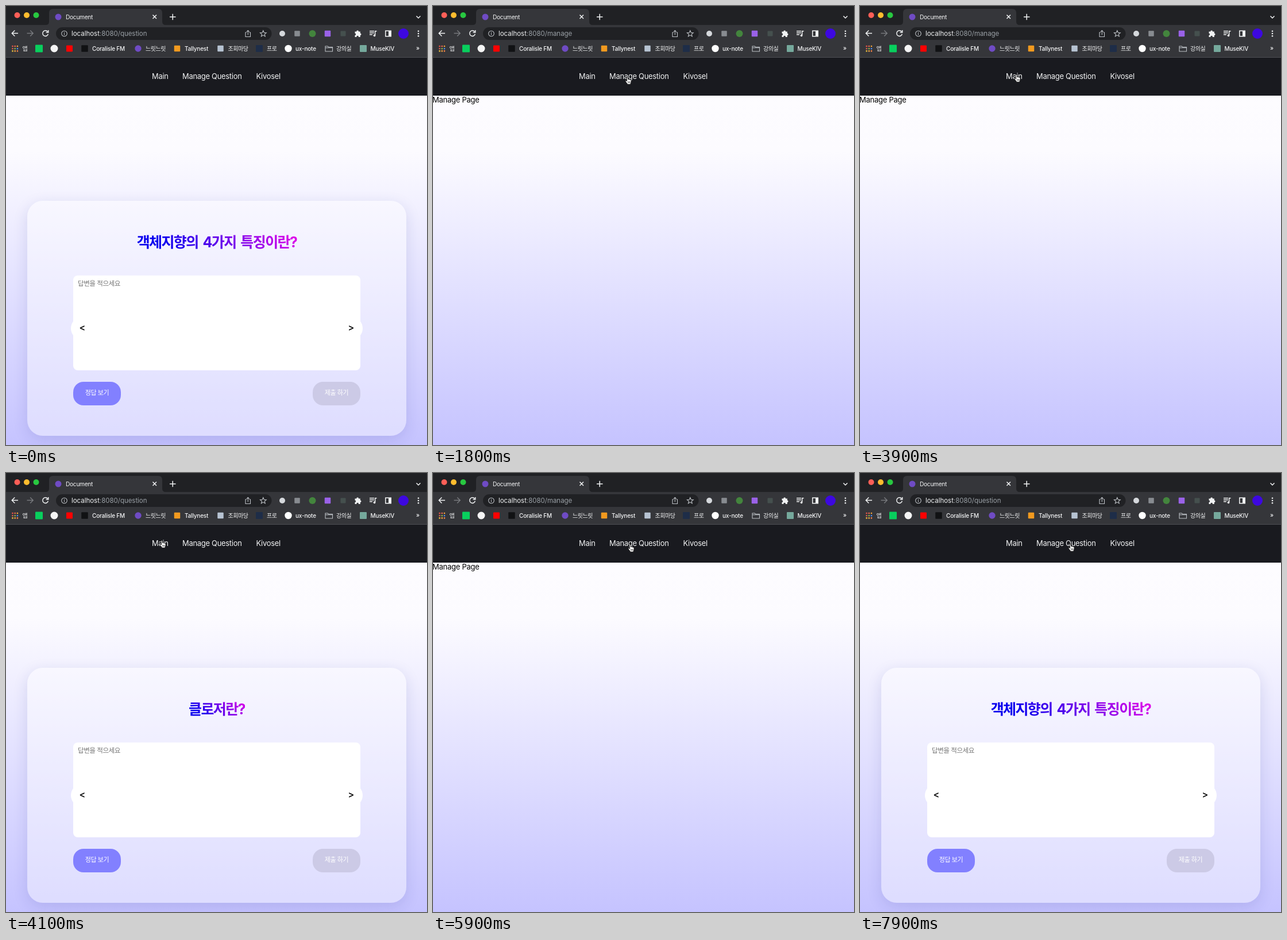
Recreate the animation shown at these times as an HTML page. Size 733 by 764 pixels, loop 8000 ms.

```html
<!DOCTYPE html>
<html lang="ko">
<head>
<meta charset="utf-8">
<title>Document</title>
<style>
  html, body { margin: 0; width: 100%; height: 100%; overflow: hidden; }
  body { position: relative; font-family: Inter, "Noto Sans CJK KR", "Noto Sans CJK", sans-serif; }
  #page, #page div, svg { position: absolute; }
  #page {
    left: 0; top: 155px; width: 733px; height: 609px; overflow: hidden;
    background: linear-gradient(#fdfcff, #fcfbff 16%, #c5c3ff);
  }
  #card {
    left: 37px; top: 184px; width: 660px; height: 409px; border-radius: 27px;
    background: rgba(255, 255, 255, .4);
    box-shadow: 0 7px 26px rgba(31, 38, 135, .13);
  }
  #title {
    left: 50%; top: 53px; transform: translateX(-50%); white-space: nowrap;
    font-size: 25px; line-height: 38px; font-weight: 700; letter-spacing: -1.6px; word-spacing: 3.5px;
    color: transparent; -webkit-background-clip: text; background-clip: text;
    background-image: linear-gradient(45deg, #0a00ee 20%, #ea00e8);
  }
  #answer {
    left: 80px; top: 130px; width: 500px; height: 165px; border-radius: 8px; background: #fff;
    color: #757575; font-size: 11.6px; line-height: 28px; letter-spacing: -.5px; text-indent: 8px;
  }
  .arrow {
    top: 202px; width: 40px; height: 40px; border-radius: 50%; background: #fff;
    text-align: center; font-size: 16px; line-height: 37px; font-weight: 600; color: #111;
  }
  .button {
    top: 314.5px; width: 83px; height: 41px; border-radius: 18px; background: #8280ff;
    text-align: center; font-size: 11px; line-height: 39px; font-weight: 500; letter-spacing: -.35px; color: #fff;
  }
  #manage { inset: 0; font-size: 13px; line-height: 16px; letter-spacing: -.25px; }
  #manage span { position: absolute; left: -1px; top: 0; white-space: nowrap; }
  #selection { top: 0; height: 16px; background: #b4d5fe; }
  svg { left: 0; top: 0; }
  .tab { font-size: 10.2px; letter-spacing: -.3px; }
  .url { font-size: 11.5px; letter-spacing: -.03px; }
  .mark { font-size: 10px; font-weight: 500; letter-spacing: -.2px; }
  .ko { letter-spacing: -.45px; }
  .nav { font-size: 12.9px; letter-spacing: -.25px; }
</style>
</head>
<body>
<div id="page">
  <div id="card">
    <div id="title"></div>
    <div id="answer">답변을 적으세요</div>
    <div class="arrow" style="left:76px">&lt;</div>
    <div class="arrow" style="left:544px">&gt;</div>
    <div class="button" style="left:80px">정답 보기</div>
    <div class="button" style="left:497px;background:#cccae6">제출 하기</div>
  </div>
  <div id="manage"><div id="selection"></div><span>Manage Page</span></div>
</div>

<svg width="733" height="764" viewBox="0 0 733 764" fill="none">
  <path fill="#202124" d="M0 0h733v34H0z"/>
  <path fill="#35363a" d="M0 33h69q6 0 6-6V12q0-7 7-7h183q7 0 7 7v15q0 6 6 6h455v57H0z"/>
  <path fill="#4c4d51" d="M0 89h733v1H0z"/>
  <path fill="#191a1f" d="M0 90h733v66H0z"/>
  <rect x="87" y="37" width="375.500" height="22" rx="11" fill="#202124"/>
  <g id="shapes"></g>
  <g stroke="#f1f3f4" stroke-width="1.5">
    <path d="M255.500 15.500l6.500 6.500m0-6.500l-6.500 6.500M285 19h10.500m-5.250-5.250v10.500M714.500 17.500l3.500 3.500 3.500-3.500"/>
    <path d="M21 47.500H10.500m4.800-5l-5 5 5 5"/>
    <path stroke="#77797d" d="M36.500 47.500H47m-4.800-5l5 5-5 5"/>
    <path d="M72.500 44.800a4.800 4.800 0 1 0 .8 4M73.700 42v4h-4"/>
  </g>
  <g stroke="#bdc1c6" stroke-width="1.1">
    <circle cx="101.500" cy="48" r="4.800"/>
    <path d="M101.500 47.200v3.300m0-5.300v1.200"/>
    <path d="M419 46h-2v7.500h8.500V46h-2m-2.200 4.500v-8m-2.300 2.300l2.300-2.300 2.300 2.300"/>
    <path d="M447.800 42.700l1.500 3.600 3.900.3-3 2.500 1 3.800-3.400-2-3.400 2 1-3.800-3-2.500 3.900-.3z"/>
    <path d="M556 70h4l1.500 1.500h7V79H556zm0 2.800h12.500"/>
  </g>
  <g fill="#f1f3f4">
    <path d="M607.500 44.500h3a1.700 1.700 0 1 1 3.300 0h3v3a1.700 1.700 0 1 1 0 3.400v3h-3a1.700 1.700 0 1 0-3.300 0h-3v-3a1.700 1.700 0 1 0 0-3.400z"/>
    <path d="M633 43h8v1.400h-8zm0 3h8v1.400h-8zm0 3h5v1.400h-5zM642 43h3.500v1.400h-2.100v6.800a1.900 1.900 0 1 1-1.400-1.800z"/>
    <path fill-rule="evenodd" d="M660 42.500h11v11h-11zm1.500 1.500v8h4.500v-8z"/>
  </g>
  <g id="labels"></g>
  <g id="cursor" stroke-linejoin="round">
    <g id="hand" stroke="#111">
      <path fill="#fff" stroke-width=".9" d="M-3-5.500c0-1.600 2-1.600 2.200 0l.4 3.300c.5-.7 1.700-.6 1.900.2.600-.6 1.700-.3 1.800.5.700-.4 1.700 0 1.700 1v2.400c0 1.600-1 2.200-1.200 4.300h-5.300c-.4-1.800-2.600-3.400-3.400-5.200-.5-1.100.900-1.800 1.700-.9l.9 1z"/>
      <path stroke-width=".7" d="M-.3 1.300v2.700M1.300 1.300v2.700M2.900 1.300v2.700"/>
    </g>
    <path id="pointer" fill="#000" stroke="#fff" stroke-width="1" d="M0 0v12l2.800-2.600 1.800 4.200 2-.9-1.800-4h3.800z"/>
    <g id="beam">
      <path stroke="#fff" stroke-width="2.600" d="M-2.500-6q2.500 0 2.500 2V4q0 2-2.500 2M2.500-6Q0-6 0-4V4q0 2 2.500 2"/>
      <path stroke="#111" stroke-width="1" d="M-2.500-6q2.500 0 2.500 2V4q0 2-2.500 2M2.500-6Q0-6 0-4V4q0 2 2.500 2M-1.500 1h3"/>
    </g>
  </g>
</svg>

<script>
const $ = id => document.getElementById(id);
const circle = (x, y, r, fill) => `<circle cx="${x}" cy="${y}" r="${r}" fill="${fill}"/>`;
const square = (x, y, s, fill) =>
  `<rect x="${x - s / 2}" y="${y - s / 2}" width="${s}" height="${s}" rx="1" fill="${fill}"/>`;
const label = (x, y, text, style, fill = '#f4f5f6') =>
  `<text x="${x}" y="${y}" class="${style}" fill="${fill}">${text}</text>`;

const appColors = ['#ea5548', '#ee6b4d', '#f2a33c', '#d9604f', '#8fb64a', '#4f8ff0', '#e5b93d', '#f0a240', '#ef8248'];
$('shapes').innerHTML = [
  circle(19.5, 16, 5, '#ff5f57'), circle(36, 16, 5, '#febc2e'), circle(52.5, 16, 5, '#28c840'),
  circle(91, 19, 5.5, '#6f4bc4'),
  ...appColors.map((c, i) => square(11.5 + i % 3 * 4.2, 70 + (i / 3 | 0) * 4.2, 2.6, c)),
  square(57.5, 74, 13, '#08cf5d'), circle(84, 74, 6.5, '#f5f5f5'), square(110.5, 74, 11, '#f00'),
  square(137, 74, 11.5, '#111214'), circle(230, 74, 5.7, '#6f4bc4'), square(298, 74, 10.5, '#f29a1f'),
  square(373.5, 74, 10.5, '#b6c3d2'), square(441, 74, 12, '#1e2d48'), circle(491.5, 74, 6.2, '#fff'),
  square(622, 74, 12, '#75a99c'),
  circle(481, 48, 5, '#d5d8dc'), square(507, 48, 9.5, '#888c91'), circle(533.5, 48, 6, '#43853d'),
  square(560, 48, 10.5, '#9a62e8'), square(587, 48, 9, '#45504e'), circle(692, 48, 9, '#3d08e0'),
  ...[43.7, 48, 52.3].map(y => circle(718, y, 1.3, '#f1f3f4')),
].join('');

$('labels').innerHTML = [
  label(104, 22.6, 'Document', 'tab'),
  `<text x="114" y="52" class="url" fill="#f1f3f4">localhost<tspan id="path" fill="#9aa0a6"></tspan></text>`,
  label(28.5, 77.6, '앱', 'mark ko'),
  label(150, 77.6, 'Coralisle FM', 'mark'),
  label(243, 77.6, '느릿느릿', 'mark ko'),
  label(311, 77.6, 'Tallynest', 'mark'),
  label(386.5, 77.6, '조회마당', 'mark ko'),
  label(454, 77.6, '프로', 'mark ko'),
  label(504, 77.6, 'ux-note', 'mark'),
  label(575, 77.6, '강의실', 'mark ko'),
  label(634.5, 77.6, 'MuseKIV', 'mark'),
  label(714, 77.2, '»', 'mark'),
  label(254, 127, 'Main', 'nav'),
  label(307, 127, 'Manage Question', 'nav'),
  label(435.5, 127, 'Kivosel', 'nav'),
].join('');

const LOOP = 8000, STEP = 100;
const OOP = '객체지향의 4가지 특징이란?', CLOSURE = '클로저란?';
// start time, question (none on the manage page)
const views = [[0, OOP], [1800, ''], [4100, CLOSURE], [5900, ''], [7200, OOP]];
// time, x, y
const moves = [
  [100, 560, 432], [500, 440, 432], [800, 440, 432], [1200, 380, 262], [1600, 342, 131],
  [1700, 341, 129], [2000, 338, 132], [2400, 338, 132], [2600, 78, 165], [2800, 34, 165],
  [3000, 8, 165], [3200, 14, 176], [3300, 20, 176], [3900, 274, 126], [4100, 273, 124],
  [4500, 325, 270], [4900, 370, 432], [5000, 372, 432], [5300, 400, 430], [5800, 345, 131],
  [5900, 345, 131], [6400, 312, 128], [6700, 312, 128], [7000, 270, 131], [7200, 270, 131],
  [7900, 368, 130],
];

function cursorAt(t) {
  const i = moves.findIndex(m => m[0] >= t);
  if (i < 1) return moves[i < 0 ? moves.length - 1 : 0].slice(1);
  const [t0, x0, y0] = moves[i - 1], [t1, x1, y1] = moves[i];
  const k = (t - t0) / (t1 - t0);
  return [x0 + (x1 - x0) * k, y0 + (y1 - y0) * k];
}

function cursorKind(x, y, managing) {
  const onLink = (x > 250 && x < 287) || (x > 303 && x < 415);
  if (onLink && y > 112 && y < 138) return 'hand';
  return managing && x < 82 && y > 155 && y < 173 ? 'beam' : 'pointer';
}

function draw(t) {
  const question = views.filter(v => v[0] <= t).pop()[1];
  $('card').style.display = question ? '' : 'none';
  $('manage').style.display = question ? 'none' : '';
  $('title').textContent = question;
  $('path').textContent = question ? ':8080/question' : ':8080/manage';

  const [x, y] = cursorAt(t);
  const kind = cursorKind(x, y, !question);
  $('cursor').style.display = t < moves[0][0] ? 'none' : '';
  $('cursor').setAttribute('transform', `translate(${x} ${y})`);
  for (const id of ['hand', 'pointer', 'beam']) $(id).style.display = id === kind ? '' : 'none';

  const left = Math.min(78, x + 4);
  $('selection').style.left = left + 'px';
  $('selection').style.width = (t >= 2600 && t < 3300 ? 78 - left : 0) + 'px';
}

const start = performance.now();
function tick() {
  const t = (performance.now() - start) % LOOP;
  draw(Math.floor(t / STEP) * STEP);
  requestAnimationFrame(tick);
}
tick();
</script>
</body>
</html>
```
